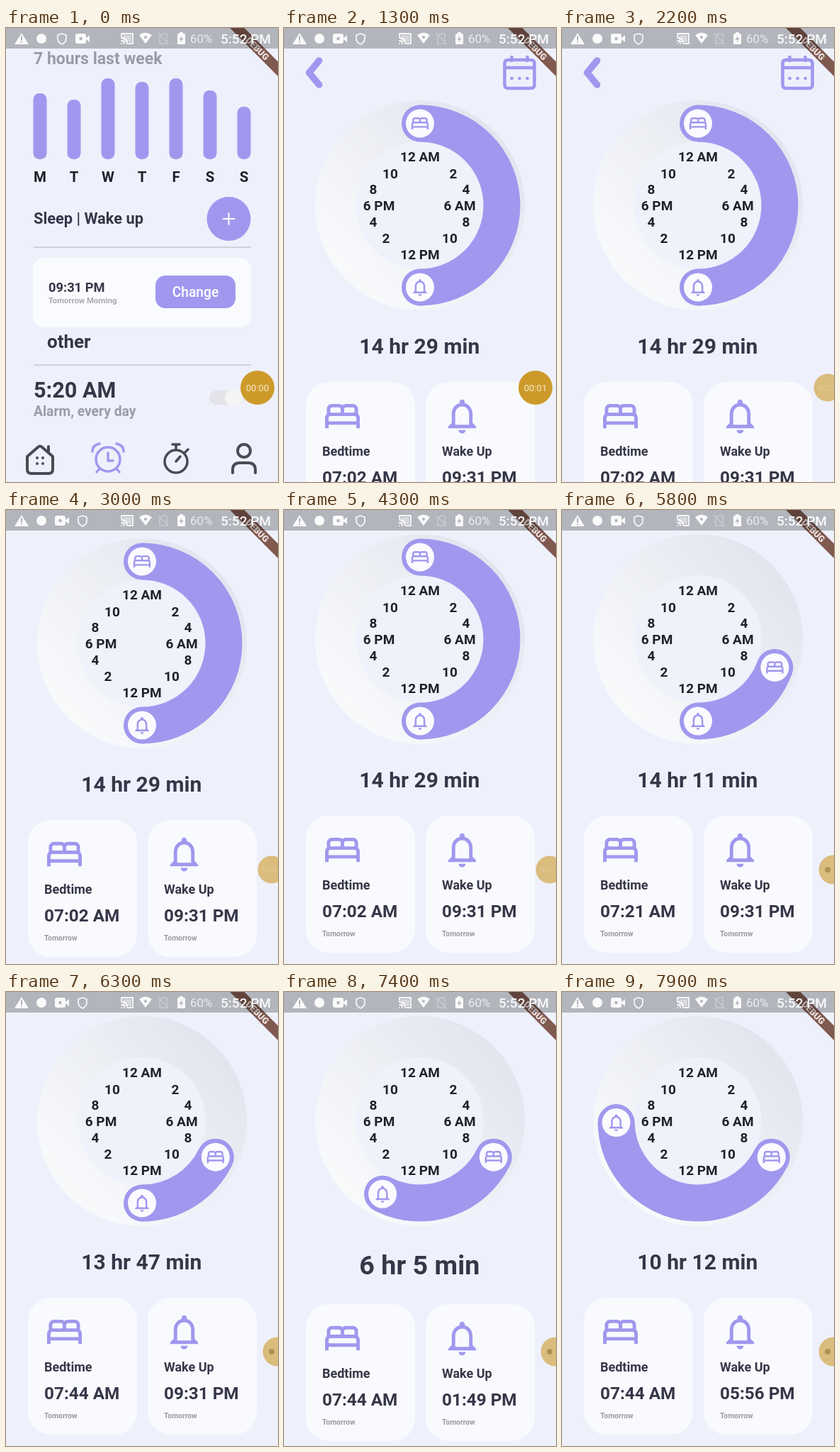
Animation, 384 px wide and 640 px high, one loop 8000 ms. Source, as an HTML page with a canvas:

```html
<!DOCTYPE html>
<html lang="en">
<head>
<meta charset="utf-8">
<title>Sleep alarm</title>
<style>
html, body { margin: 0; overflow: hidden; }
canvas { display: block; }
</style>
</head>
<body>
<canvas width="384" height="640"></canvas>
<script>
const c = document.querySelector('canvas').getContext('2d');
const LOOP = 8000, SCROLL = 68, BAR = 29;
const BG = '#eef1fc', PURPLE = '#a098ee', DARK = '#363648', INK = '#20202b', GREY = '#9b9ba6', NAV = '#4a4a55';

// Bed and bell are filled outlines on a 24 unit grid, the others are strokes around their centre.
const ICONS = {
  bed: 'M21 10.78V8c0-1.65-1.35-3-3-3h-4c-.77 0-1.47.3-2 .78-.53-.48-1.23-.78-2-.78H6C4.35 5 3 6.35 3 8v2.78c-.61.55-1 1.34-1 2.22v6h2v-2h16v2h2v-6c0-.88-.39-1.67-1-2.22zM14 7h4c.55 0 1 .45 1 1v2h-6V8c0-.55.45-1 1-1zM5 8c0-.55.45-1 1-1h4c.55 0 1 .45 1 1v2H5zM4 15v-2c0-.55.45-1 1-1h14c.55 0 1 .45 1 1v2z',
  bell: 'M12 22c1.1 0 2-.9 2-2h-4c0 1.1.9 2 2 2zM18 16v-5c0-3.07-1.63-5.64-4.5-6.32V4c0-.83-.67-1.5-1.5-1.5s-1.5.67-1.5 1.5v.68C7.64 5.36 6 7.92 6 11v5l-2 2v1h16v-1zM16 17H8v-6c0-2.48 1.51-4.5 4-4.5s4 2.02 4 4.5z',
  back: 'M8 -17L-6 0L8 17',
  calendar: 'M-16 -19H16Q21 -19 21 -14V16Q21 21 16 21H-16Q-21 21 -21 16V-14Q-21 -19 -16 -19ZM-21 -8H21M-11 -23V-18M11 -23V-18M-11 7h.1M0 7h.1M11 7h.1',
  house: 'M-18 -4L-3 -17Q0 -20 3 -17L18 -4V14Q18 20 12 20H-12Q-18 20 -18 14ZM12 -9V-18',
  alarm: 'M17 2A17 17 0 1 1 -17 2A17 17 0 1 1 17 2M0 -7V4H7M-12 15L-16 20M12 15L16 20M-22 -9Q-22 -18 -12 -20M22 -9Q22 -18 12 -20',
  stopwatch: 'M16 4A16 16 0 1 1 -16 4A16 16 0 1 1 16 4M-5 -20H5M0 -20V-12M13 -9L17 -13M0 4L6 -3',
  person: 'M9 -11A9 9 0 1 1 -9 -11A9 9 0 1 1 9 -11M-16 20V16Q-16 6 -6 6H6Q16 6 16 16V20'
};

const clamp = v => Math.max(0, Math.min(1, v));

// Linear interpolation through [time, value] stops.
function track(t, stops) {
  let [t0, v0] = stops[0];
  for (const [t1, v1] of stops) {
    if (t < t1) return v0 + (v1 - v0) * clamp((t - t0) / (t1 - t0));
    [t0, v0] = [t1, v1];
  }
  return v0;
}

function text(s, x, y, size, color, align = 'left', weight = 700) {
  c.font = `${weight} ${size}px Roboto, sans-serif`;
  c.fillStyle = color;
  c.textAlign = align;
  c.fillText(s, x, y + size * 0.355);
}

function disc(x, y, r, color) {
  c.fillStyle = color;
  c.beginPath();
  c.arc(x, y, r, 0, 7);
  c.fill();
}

function box(x, y, w, h, r, color) {
  c.fillStyle = color;
  c.beginPath();
  c.roundRect(x, y, w, h, r);
  c.fill();
}

// Strokes the path when a line width is given, otherwise fills it.
function shape(path, x, y, color, width = 0) {
  c.save();
  c.translate(x, y);
  c.lineCap = c.lineJoin = 'round';
  c.strokeStyle = c.fillStyle = color;
  c.lineWidth = width;
  const p = new Path2D(path);
  width ? c.stroke(p) : c.fill(p);
  c.restore();
}

function glyph(name, x, y, scale) {
  c.save();
  c.translate(x, y);
  c.scale(scale, scale);
  c.translate(-12, -12);
  c.fillStyle = PURPLE;
  c.fill(new Path2D(ICONS[name]), 'evenodd');
  c.restore();
}

function home() {
  text('7 hours last week', 39, 43, 23, GREY);
  [92, 101, 71, 76, 71, 88, 111].forEach((top, i) => {
    const x = 48 + i * 48;
    box(x - 9.5, top, 19, 185 - top, 8.5, PURPLE);
    text('MTWTFSS'[i], x, 210, 20.5, INK, 'center');
  });
  text('Sleep | Wake up', 39, 268, 21.8, DARK);
  disc(314.5, 269, 31, PURPLE);
  shape('M-8 0H8M0 -8V8', 314.5, 269, '#fff', 2);
  for (const y of [308, 474]) box(39, y, 307, 2, 0, '#d0d1dc');

  box(38, 324, 308, 98, 16, '#fafbfe');
  text('09:31 PM', 60, 366, 18.3, DARK);
  text('Tomorrow Morning', 60, 384, 11.3, '#a9a9b2');
  box(211, 349, 113, 46, 14, PURPLE);
  text('Change', 267.5, 372, 19.3, '#fff', 'center', 500);

  text('other', 58, 442, 26, DARK);
  text('5:20 AM', 39, 510, 30.6, DARK);
  text('Alarm, every day', 39, 540, 19.3, GREY);
  box(287, 511, 50, 20, 10, '#e3e3e9');
  disc(322, 521, 13, '#f4f4f4');

  shape(ICONS.house, 48, 608, NAV, 4);
  for (const dx of [-4, 4]) for (const dy of [0, 8]) disc(48 + dx, 606 + dy, 2, NAV);
  shape(ICONS.alarm, 144, 606, PURPLE, 3.5);
  shape(ICONS.stopwatch, 240, 607, NAV, 3.5);
  shape(ICONS.person, 336, 607, NAV, 4);
}

function handle(angle, icon) {
  const x = 192 + 115.5 * Math.cos(angle), y = 250 + 115.5 * Math.sin(angle);
  disc(x, y, 26, PURPLE);
  disc(x, y, 20, '#fafaff');
  glyph(icon, x, y, 1.22);
}

function dial(bed, bell) {
  const ring = c.createLinearGradient(90, 330, 290, 150);
  ring.addColorStop(0, '#f8f9fb');
  ring.addColorStop(1, '#e3e6ef');
  disc(192, 250, 148, ring);
  disc(192, 250, 90, '#eff1fb');

  const [from, to] = [bed, bell].map(deg => (deg - 90) * Math.PI / 180);
  c.strokeStyle = PURPLE;
  c.lineWidth = 52;
  c.beginPath();
  c.arc(192, 250, 115.5, from, to);
  c.stroke();
  handle(from, 'bed');
  handle(to, 'bell');

  [['12 AM', 0, -69], ['2', 47, -45], ['4', 65, -23], ['6 AM', 56, 0], ['8', 65, 23], ['10', 42, 46],
   ['12 PM', 0, 69], ['2', -48, 46], ['4', -66, 23], ['6 PM', -58, 0], ['8', -66, -23], ['10', -42, -45]]
    .forEach(([s, dx, dy]) => text(s, 192 + dx, 250 + dy, 19, INK, 'center'));
}

function clock(minutes) {
  const m = Math.round(minutes), h = Math.floor(m / 60);
  const pad = n => String(n).padStart(2, '0');
  return `${pad(h % 12 || 12)}:${pad(m % 60)} ${h < 12 ? 'AM' : 'PM'}`;
}

function card(x, y, icon, label, minutes) {
  box(x, y, 154, 193, 32, '#f9fafe');
  glyph(icon, x + 51.5, y + 48, 2.45);
  text(label, x + 23, y + 98, 18, DARK);
  text(clock(minutes), x + 23, y + 134, 24.3, DARK);
  text('Tomorrow', x + 23, y + 166, 10.3, GREY);
}

function detail(t) {
  const bed = track(t, [[4700, 0], [5200, 58], [5600, 102], [5800, 110.2], [6300, 116]]);
  const bell = track(t, [[7200, 180], [7300, 193], [7400, 207.25], [7900, 269]]);
  // Times follow the handles only once they have been dragged; one degree is four minutes.
  const bedTime = bed > 0 ? bed * 4 : 422.3;
  const bellTime = bell > 180 ? bell * 4 : 1291.4;
  const span = Math.round(bellTime - bedTime);
  const scroll = SCROLL * (1 - (1 - clamp((t - 2500) / 900)) ** 3);

  c.save();
  c.translate(0, -scroll);
  shape(ICONS.back, 41.5, 63, PURPLE, 9.5);
  shape(ICONS.calendar, 332.5, 64, PURPLE, 4.6);
  dial(bed, bell);

  // The duration always fills the same width, and its height pushes the cards.
  const label = `${Math.floor(span / 60)} hr ${span % 60} min`;
  c.font = '700 100px Roboto, sans-serif';
  const size = 17000 / c.measureText(label).width;
  const grow = (size - 30) * 1.17;
  text(label, 191.3, 448.2 + grow / 2, size, DARK, 'center');
  card(31, 499 + grow, 'bed', 'Bedtime', bedTime);
  card(200, 499 + grow, 'bell', 'Wake Up', bellTime);
  c.restore();
}

function debugBanner() {
  c.save();
  c.translate(384, 0);
  c.rotate(Math.PI / 4);
  box(-60, 33.6, 120, 14.4, 0, '#80594f');
  text('DEBUG', 0, 41, 12.5, '#f2e8e6', 'center', 900);
  c.restore();
}

function statusBar(t) {
  box(0, 0, 384, BAR, 0, 'rgba(0,0,0,.25)');
  const white = '#fafafa', shade = '#b3b4bd', [video, shield] = t < 100 ? [108, 79] : [79, 108];
  shape('M0 -8L10 8H-10Z', 22, 15, white);
  shape('M0 -3V2M0 5V5.2', 22, 15, shade, 2);
  disc(50, 15, 7, white);
  box(video - 10, 8, 15, 14, 3, white);
  shape('M4 0L10 -5V5Z', video, 15, white);
  disc(video - 2.5, 15, 2.2, shade);
  shape('M0 -7L6 -5V0Q6 5 0 8Q-6 5 -6 0V-5Z', shield, 15, white, 1.7);
  box(165, 10, 12, 10, 0, 'rgba(255,255,255,.5)');
  shape('M-8 -3V-7H8V7H2M-8 7V6.8M-8 3Q-4 3 -4 7M-8 -1Q0 -1 0 7', 171, 15, white, 1.8);
  shape('M-9 -4Q0 -11 9 -4L0 8Z', 197, 14, white);
  disc(197, 13, 2, shade);
  shape('M-5 -3L-1 -7H5V7H-5ZM-7 -7L7 7', 222, 15, 'rgba(255,255,255,.3)', 1.6);
  box(242, 8, 11, 15, 1.5, white);
  box(245, 6, 5, 3, 0, white);
  shape('M1 -5L-3 1H0L-1 5L3 -1H0Z', 247.5, 15.5, shade);
  text('60%', 260, 15, 17, '#ececef', 'left', 400);
  text('5:52 PM', 303, 15, 19, white, 'left', 500);
}

function recorder(t) {
  const dock = clamp((t - 1600) / 400), idle = t >= 4800;
  const x = 355 + 20 * dock;
  c.save();
  c.globalAlpha = 1 - 0.4 * dock;
  disc(idle ? 383 : x, 507, idle ? 20.5 : 24 - 4.5 * dock, '#cd9a2a');
  if (idle) disc(375, 507, 4, '#93743a');
  else text('00:0' + Math.floor(t / 1000), x, 507, 13 - 2 * dock, `rgba(246,234,208,${1 - dock / 2})`, 'center', 400);
  c.restore();
}

function draw(t) {
  c.fillStyle = BG;
  c.fillRect(0, 0, 384, 640);
  const enter = clamp((t - 800) / 500);
  if (enter < 1) home();
  if (enter > 0) {
    c.save();
    c.globalAlpha = enter;
    c.translate(0, 160 * (1 - enter) ** 3);
    c.fillStyle = BG;
    c.fillRect(0, 0, 384, 640);
    detail(t);
    c.restore();
  }
  c.fillStyle = BG;
  c.fillRect(0, 0, 384, BAR);
  debugBanner();
  statusBar(t);
  recorder(t);
}

function tick() {
  draw(Math.floor(performance.now() % LOOP / 100) * 100);
  requestAnimationFrame(tick);
}
tick();
</script>
</body>
</html>
```
